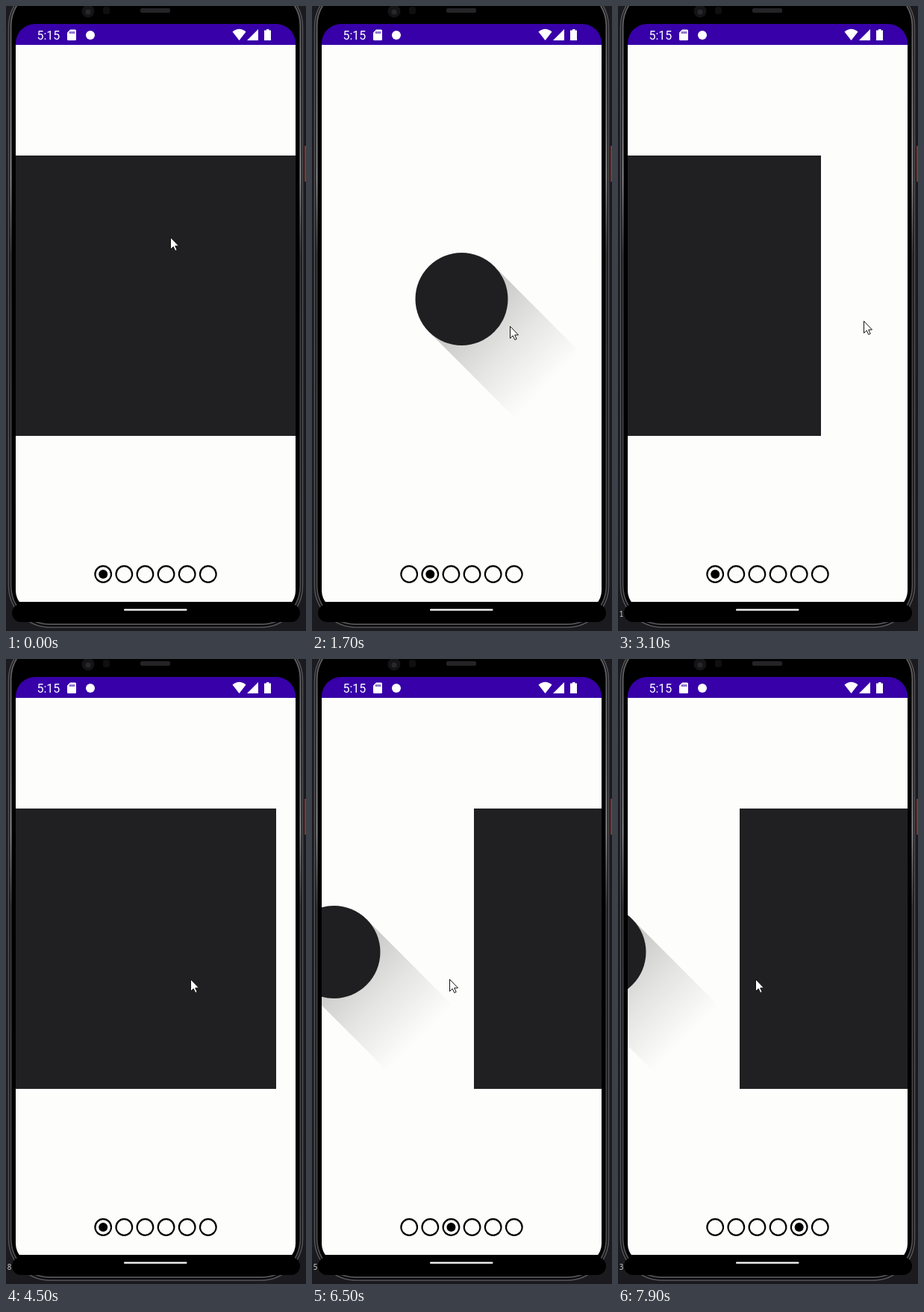
Write an HTML page that moves like this. It is 402 px wide and 836 px high and loops after 8 s.

```html
<!DOCTYPE html>
<html lang="en">
<head>
<meta charset="utf-8">
<title>Pager with radio indicators</title>
<style>
  html, body { margin: 0; width: 100%; height: 100%; overflow: hidden; background: #1b1b1f; }
  svg { display: block; width: 402px; height: 836px; }
  text { font-family: Roboto, Arial, sans-serif; }
  #log { font-family: "Noto Sans Mono", "DejaVu Sans Mono", monospace; }
</style>
</head>
<body>
<svg viewBox="0 0 402 836">
  <defs>
    <clipPath id="screen"><rect x="13" y="24" width="375" height="784" rx="26"/></clipPath>
    <clipPath id="pager"><rect x="13" y="52" width="375" height="745"/></clipPath>
    <linearGradient id="fade">
      <stop offset=".15" stop-color="#cbcbc9"/>
      <stop offset=".55" stop-color="#e5e5e4"/>
      <stop offset="1" stop-color="#fdfdfc"/>
    </linearGradient>
    <linearGradient id="rim" x2="0" y2="1">
      <stop offset="0" stop-color="#55555a"/>
      <stop offset=".3" stop-color="#8a8a8e"/>
      <stop offset=".42" stop-color="#3a3a3e"/>
      <stop offset="1" stop-color="#4c4c50"/>
    </linearGradient>
  </defs>

  <!-- phone body -->
  <rect width="402" height="836" fill="#1b1b1f"/>
  <rect x="400" y="187" width="2" height="48" fill="#7c3a32"/>
  <rect x="3.5" y="-28" width="394" height="859" rx="56" fill="#08080a" stroke="#56565a" stroke-width="1.5"/>
  <rect x="6.5" y="-25" width="388" height="852" rx="52" fill="#000" stroke="url(#rim)" stroke-width="2"/>
  <rect x="8" y="800" width="386" height="24" rx="12" fill="#000"/>
  <rect x="180" y="3" width="40" height="6" rx="2" fill="#242427"/>
  <circle cx="110" cy="7" r="8.5" fill="#141416"/>
  <circle cx="110" cy="8" r="3.5" fill="#28282b"/>
  <rect x="130" y="1" width="9" height="10" rx="3" fill="#0f0f11"/>
  <text id="log" x="1.5" y="817" font-size="10" fill="#cdcdcd"></text>

  <!-- screen -->
  <g clip-path="url(#screen)">
    <rect x="13" y="24" width="375" height="28" fill="#3700a8"/>
    <rect x="13" y="52" width="375" height="745" fill="#fdfdfc"/>
    <rect x="13" y="797" width="375" height="30" fill="#000"/>
    <g clip-path="url(#pager)"><g id="pages"></g></g>
  </g>
  <g id="dots" fill="none" stroke="#000" stroke-width="2.2"></g>
  <circle id="mark" cy="760" r="6"/>
  <rect x="158" y="806.5" width="84.5" height="2.2" rx="1" fill="#fff"/>

  <!-- status bar -->
  <g fill="#fff">
    <text x="41.5" y="45" font-size="16">5:15</text>
    <path d="M86 31.5H92.5Q94 31.5 94 33V44.5Q94 46 92.5 46H83.5Q82 46 82 44.5V35.5Z"/>
    <path d="M86 34v3M88.5 34v3M91 34v3" stroke="#3700a8" stroke-width="1.3"/>
    <circle cx="113" cy="39" r="6"/>
    <path d="M303.5 34.5Q312.5 27 321.5 34.5L312.5 46Z"/>
    <path d="M338 31V46H323Z"/>
    <path d="M349 31h3.5v1.5H355V46H346V32.5h3Z"/>
  </g>

  <path id="cursor" d="M.5 .5V16.5L4.2 13L6.8 18.5L9.2 17.4L6.7 12H11.5Z"
        fill="#fff" stroke="#141414" stroke-width="1"/>
</svg>

<script>
const LOOP = 8000, STEP = 100, PAGE = 375;
const DRAG = 250, SETTLE = 500;
const HELD = .26;   // share of a page dragged before release
const $ = id => document.getElementById(id);

const lerp = (a, b, u) => a + (b - a) * u;
const clamp = u => Math.min(1, Math.max(0, u));
const smooth = u => u ** 3 * (u * (6 * u - 15) + 10);
const pull = u => u ** 1.6;
const fling = u => 1 - (1 - u) ** 5;

// release time and pages turned; the pointer path follows from the direction
let page = 0;
const swipes = [[1100, 1], [2100, 1], [2954, -2], [4640, 1], [6470, 1], [7150, 1], [7842, 1]]
  .map(([release, turn]) => {
    const from = page, to = page += turn;
    const y = turn > 0 ? 428 : 421;
    const x = turn > 0 ? 270 : 158;
    return { press: release - DRAG, release, from, to, held: from + HELD * Math.sign(turn),
             grab: [x, y], drop: [x - 86 * turn, y] };
  });
const idle = { release: 0, to: 0, drop: [220, 309] };

const square = x => `<rect x="${x}" y="200" width="${PAGE}" height="375" fill="#202023"/>`;
const disc = x => `<g transform="translate(${x + 187.5} 392)">
  <rect y="-62" width="163" height="124" fill="url(#fade)" transform="rotate(45)"/>
  <circle r="62" fill="#1f1f21"/></g>`;

const dotX = i => 130.2 + i * 28.12;
const six = [...Array(6).keys()];
$("pages").innerHTML = six.map(i => (i % 2 ? disc : square)(13 + i * PAGE)).join("");
$("dots").innerHTML = six.map(i => `<circle cx="${dotX(i)}" cy="760" r="10.8"/>`).join("");

function pose(t) {
  const next = swipes.find(s => s.release > t);
  const last = swipes.findLast(s => s.release <= t) || idle;
  const move = (a, b, u) => a.map((v, i) => Math.round(lerp(v, b[i], u)));

  if (next && t >= next.press) {
    const u = pull((t - next.press) / DRAG);
    return { page: lerp(next.from, next.held, u), dot: last.to, tip: move(next.grab, next.drop, u) };
  }
  const u = clamp((t - last.release) / SETTLE);
  const settled = last === idle ? 0 : lerp(last.held, last.to, fling(u));
  const tip = next
    ? move(last.drop, next.grab, smooth((t - last.release) / (next.press - last.release)))
    : last.drop;
  return { page: settled, dot: last.to, tip };
}

function draw(t) {
  const { page, dot, tip } = pose(t);
  $("pages").setAttribute("transform", `translate(${-Math.round(page * PAGE)} 0)`);
  $("mark").setAttribute("cx", dotX(dot));
  $("cursor").setAttribute("transform", `translate(${tip})`);
  $("log").textContent = "1853"[Math.floor((t - 1900) / 1800)] || "";
}

const start = performance.now();
function tick() {
  const t = (performance.now() - start) % LOOP;
  draw(Math.floor(t / STEP) * STEP);
  requestAnimationFrame(tick);
}
tick();
</script>
</body>
</html>
```
